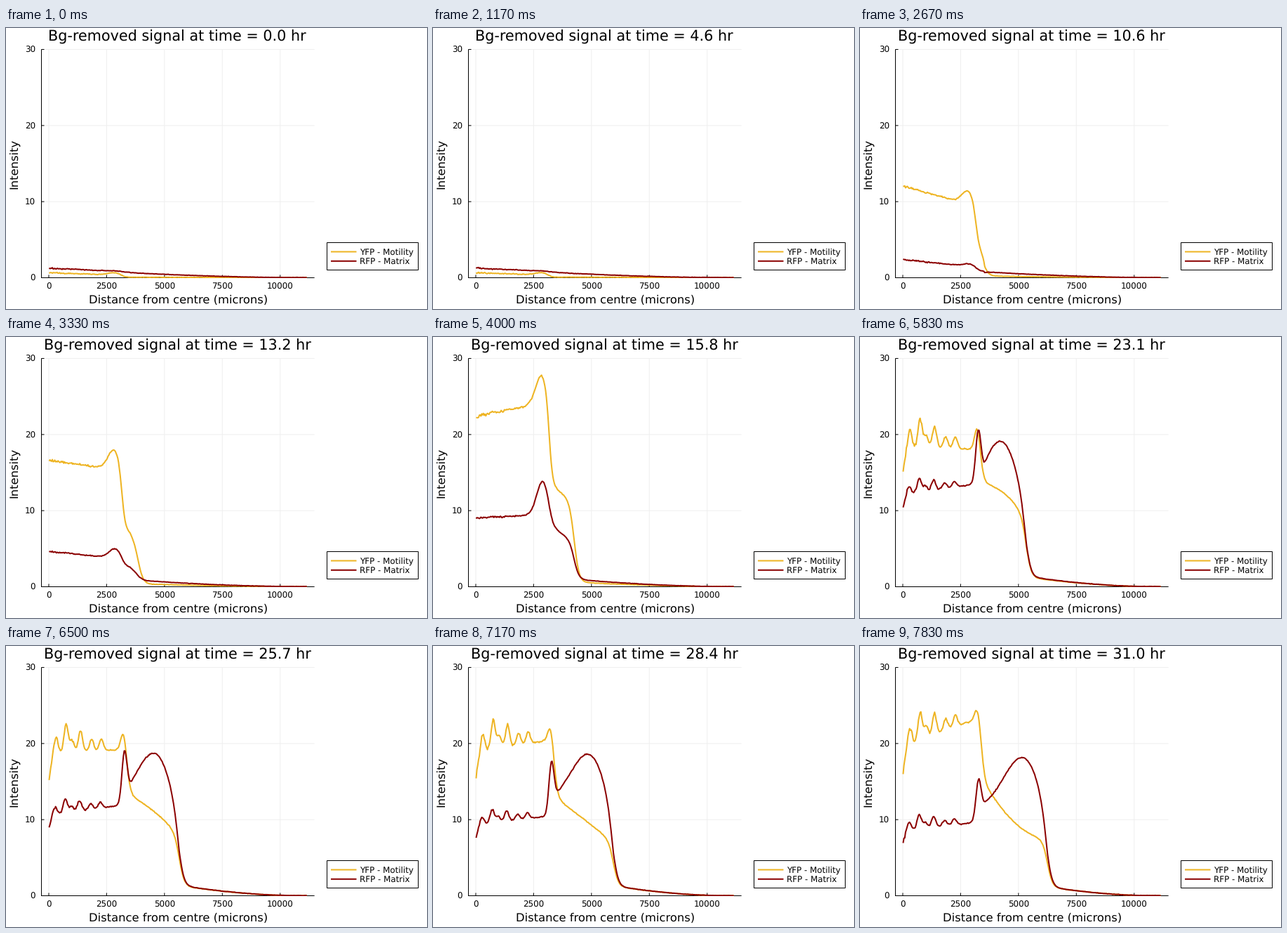
Recreate the animation shown at these times as a matplotlib script. Size 600 by 400 pixels, loop 8 s.

```python
import numpy as np
import matplotlib.pyplot as plt
from matplotlib.animation import FuncAnimation
from matplotlib.patches import Rectangle

W, H, DPI = 600, 400, 100
LOOP_MS, TICK_MS, STEPS = 8000, 40, 48
HOURS_PER_STEP = 0.66
LEFT, RIGHT, TOP, BASE = 50.5, 439.6, 30.5, 355.5
GOLD, RED, GRID = "#EEB422", "#8B0000", "#efefef"
TITLE_PX, LABEL_PX, SMALL_PX = 20.75, 16.35, 11.87

plt.rcParams.update({"font.family": "DejaVu Sans", "text.hinting": "none",
                     "path.snap": False})


def px(microns):
    return 61 + 0.03297 * np.asarray(microns)


def py(intensity):
    return BASE - (BASE - TOP) / 30 * np.asarray(intensity)


def pt(pixels):
    return pixels * 72 / DPI


# ---- signal model: core disc, rim, spreading shoulder, background halo ----
X = np.linspace(14, 11150, 320)
POSE_HOURS = [4.6, 10.6, 15.8, 23.1, 28.4, 31]
RING_X = np.array([300, 750, 1010, 1370, 1850, 2270])
RING_SIZE = [0.8, 1.2, 0.5, 0.9, 0.5, 0.5]


def rise(x, mid, width):
    return 1 / (1 + np.exp((mid - x) / width))


def hump(x, mid, width):
    return np.exp(-((x - mid) / width) ** 2 / 2)


def grow(hours, levels):
    """Exponential growth or decay between key levels."""
    return np.exp(np.interp(hours, POSE_HOURS, np.log(levels)))


class Channel:
    def __init__(self, seed, floor, ring, ring_shift, rim_shift, skew,
                 bow, **levels):
        self.seed, self.floor, self.ring = seed, floor, ring
        self.ring_shift, self.rim_shift, self.skew = ring_shift, rim_shift, skew
        self.bow, self.levels = bow, levels

    def profile(self, step):
        h = step * HOURS_PER_STEP
        late = rise(h, 19, 1)
        front = np.interp(h, [10.6, 15.8, 23.1, 31], [3520, 4250, 5350, 6260])
        lv = {name: grow(h, keys) for name, keys in self.levels.items()}

        core = lv["core"] + (lv["edge"] - lv["core"]) * X / 2700
        rings = sum(s * hump(X, c + self.ring_shift, 90)
                    for c, s in zip(RING_X, RING_SIZE))
        core += self.ring * late * (rings - 1.25 * np.exp(-X / 130))

        u = np.clip((X - 3500) / (front - 3500), 0, 1)
        arch = np.sin(np.pi * u ** (1 + self.skew * max(h - 23, 0)))
        shoulder = (lv["shoulder"] + (lv["lip"] - lv["shoulder"]) * u
                    + np.interp(h, POSE_HOURS, self.bow) * arch)

        y = core + (shoulder - core) * rise(X, 3160 + 240 * late, 75)
        y += lv["rim"] * hump(X, 2820 + 400 * late + self.rim_shift, 260 - 150 * late)

        halo = self.floor + (5.5 - self.floor) * rise(h, 19.5, 3.3)
        fade = 0.03 + halo * np.clip(1 - X / 10500, 0, 1) ** 1.7
        y += (fade - y) * rise(X, front, 105)

        noise = np.random.default_rng(self.seed + step).normal(size=X.size)
        y += noise * (0.045 + 0.004 * y) * (0.25 + 0.75 * np.exp(-X / 1500))
        return np.maximum(y, 0)


yfp = Channel(
    seed=100, floor=0.06, ring=3.1, ring_shift=0, rim_shift=0, skew=0,
    bow=[0, 0, 0, 0.8, 0, -1.5],
    core=[0.65, 12.3, 22.4, 18.5, 19, 19.6],
    edge=[0.38, 10, 24, 18.1, 20.2, 22.7],
    rim=[0.3, 1.8, 3.8, 3, 2, 1.6],
    shoulder=[0.06, 4, 12.7, 13.7, 12.8, 14.8],
    lip=[0.05, 3, 11.3, 9, 7, 7.2])
rfp = Channel(
    seed=500, floor=1.25, ring=1.5, ring_shift=-40, rim_shift=50, skew=0.06,
    bow=[0, 0, 0, 5.9, 7.2, 7.5],
    core=[1.25, 2.4, 9, 12.1, 9.3, 8.6],
    edge=[0.9, 1.55, 9.4, 13.3, 10.3, 9.5],
    rim=[0.03, 0.35, 4.4, 6.7, 6.6, 5.2],
    shoulder=[0.75, 0.9, 7.3, 16.2, 13.9, 12.5],
    lip=[0.65, 0.6, 6, 9.5, 9.5, 9.5])

# ---- stage ----------------------------------------------------------------
fig = plt.figure(figsize=(W / DPI, H / DPI), dpi=DPI, facecolor="white")
ax = fig.add_axes([0, 0, 1, 1])
ax.set(xlim=(0, W), ylim=(H, 0))
ax.axis("off")


def stroke(x, y, color="black", width=1.0, z=2):
    return ax.plot(x, y, color=color, lw=pt(width), zorder=z,
                   solid_capstyle="butt", solid_joinstyle="round")[0]


def write(x, y, s, size, **kw):
    return ax.text(x, y, s, fontsize=pt(size), color="black",
                   ha="left", va="baseline", **kw)


DIGIT = 0.636 * SMALL_PX
for v in range(0, 10001, 2500):
    x = px(v)
    stroke([x, x], [TOP, BASE], GRID, z=1)
    stroke([x, x], [BASE, BASE - 4])
    write(x - len(str(v)) * DIGIT / 2, 372, str(v), SMALL_PX)
for v in range(0, 31, 10):
    y = py(v)
    stroke([LEFT, RIGHT], [y, y], GRID, z=1)
    stroke([LEFT, LEFT + 4], [y, y])
    write(42 - len(str(v)) * DIGIT, y + 4.5, str(v), SMALL_PX)
stroke([LEFT, LEFT], [TOP, BASE + 0.5])
stroke([LEFT - 0.5, RIGHT], [BASE, BASE])

write(118, 392, "Distance from centre (microns)", LABEL_PX)
write(16, 228.7, "Intensity", LABEL_PX, rotation=90, rotation_mode="anchor")
title = write(60.5, 19, "", TITLE_PX)

ax.add_patch(Rectangle((457.5, 305.5), 130, 39, fc="white", ec="black", lw=pt(1)))
for y, color, name in [(318.5, GOLD, "YFP - Motility"), (331.8, RED, "RFP - Matrix")]:
    stroke([463, 499.5], [y, y], color, 2)
    write(504, y + 4.3, name, SMALL_PX)

window = Rectangle((LEFT, TOP), RIGHT - LEFT, BASE + 0.5 - TOP, transform=ax.transData)
curves = []
for channel, color, z in [(yfp, GOLD, 3), (rfp, RED, 4)]:
    line = stroke(px(X), py(0 * X), color, 2, z)
    line.set_clip_path(window)
    curves.append((channel, line))


def update(tick):
    # a step counts as begun if it starts within the tick
    step = int((tick * TICK_MS + TICK_MS - 5) * STEPS / LOOP_MS)
    hours = f"{step * HOURS_PER_STEP:.1f}"
    title.set_text(f"Bg-removed signal at time = {hours} hr")
    title.set_x(60.5 if len(hours) == 3 else 54)
    for channel, line in curves:
        line.set_ydata(py(channel.profile(step)))
    return [title] + [line for _, line in curves]


anim = FuncAnimation(fig, update, frames=LOOP_MS // TICK_MS, interval=TICK_MS,
                     repeat=True, repeat_delay=0, blit=False)
plt.show()
```
